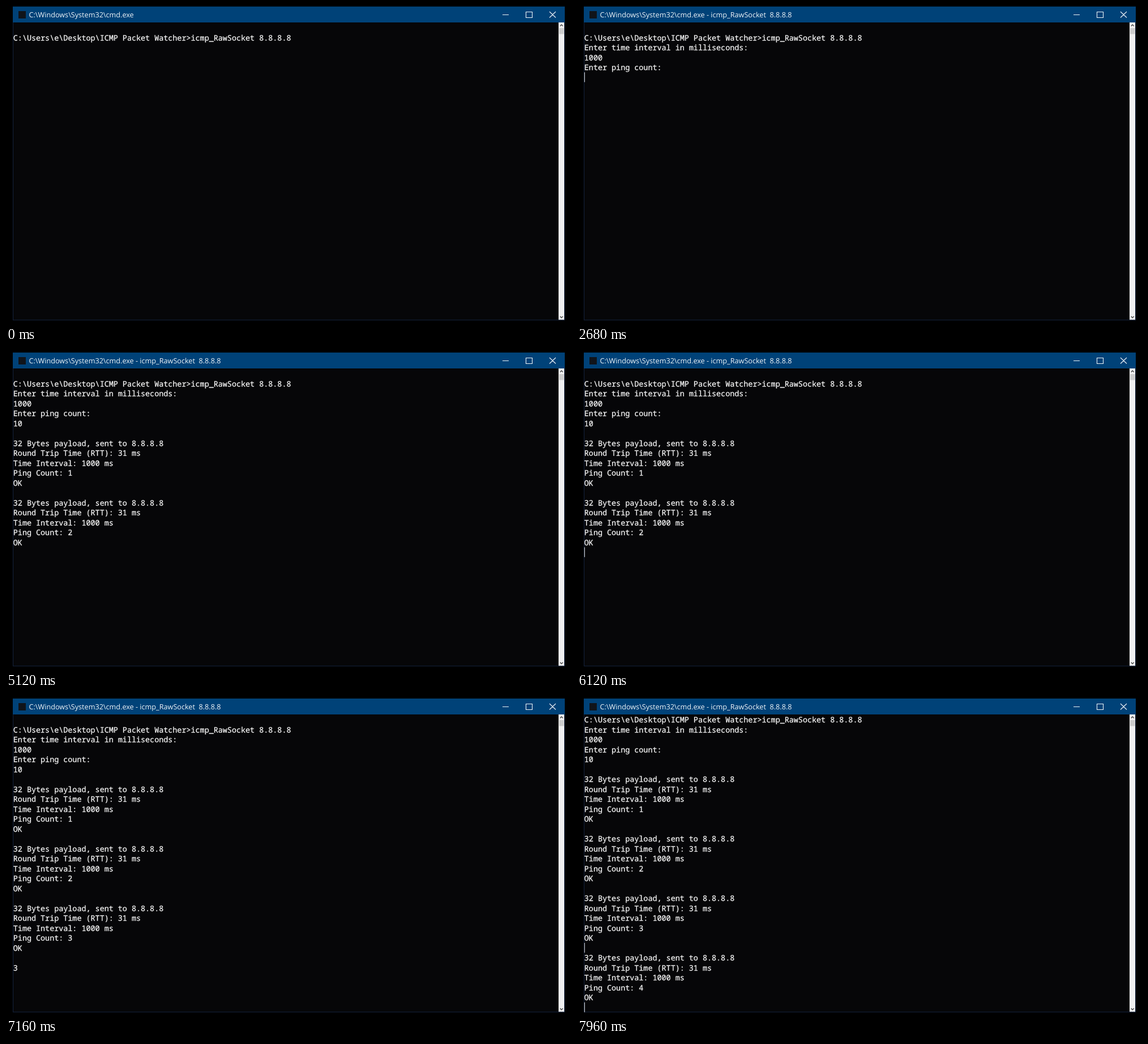
These frames come from a looping animation (998 by 561 pixels, 8 s). An HTML page:

```html
<!DOCTYPE html>
<html lang="en">
<head>
<meta charset="utf-8">
<title>Console</title>
<style>
  html, body { margin: 0; width: 100%; height: 100%; overflow: hidden; background: #000; }
  svg { display: block; width: 100vw; height: 100vh; }
  text { white-space: pre; text-rendering: geometricPrecision; }
  #title { font: 12.65px "Open Sans", "Noto Sans", sans-serif; fill: #f0f4f8; }
  #rows text {
    font: 13.42px "Noto Sans Mono", "DejaVu Sans Mono", monospace;
    fill: #f4f4f4; stroke: #f4f4f4; stroke-width: .3;
  }
  .buttons { fill: none; stroke: #f0f4f8; stroke-width: 1.1; }
  .arrows { fill: none; stroke: #444; stroke-width: 1.3; }
</style>
</head>
<body>
<svg viewBox="0 0 998 561" xmlns="http://www.w3.org/2000/svg">
  <rect width="998" height="561" fill="#000"/>
  <rect x="12" y="1" width="975" height="553.5" fill="#14223e"/>
  <rect x="13" y="29" width="963" height="524.5" fill="#060608"/>
  <rect x="12" y="1" width="975" height="28" fill="#004278"/>
  <rect x="22" y="9" width="13" height="13" fill="#10141a"/>
  <text id="title" x="40.5" y="20.3"></text>
  <path class="buttons" d="M877 15.5H888M918.5 10.5H929.5V20.5H918.5ZM960 10L971 20.5M971 10L960 20.5"/>
  <rect x="976" y="29" width="10" height="524.5" fill="#f0f0f0"/>
  <rect x="977" y="39" width="8.5" height="10.5" fill="#cdcdcd"/>
  <path class="arrows" d="M978.7 35.5L981.2 33L983.7 35.5M978.7 547.5L981.2 550L983.7 547.5"/>
  <g id="screen">
    <g id="rows"></g>
    <rect id="ghost" width="1.1" height="17.3" fill="#c8c8c8"/>
    <rect id="caret" width="1.1" height="17.3" fill="#d8d8d8"/>
  </g>
</svg>
<script>
const LOOP = 8000, PITCH = 17.5, TOP = 47, LEFT = 12.8, CHAR = 8.05;
const BLINK = 1060, BLINK_START = 420;
const ENTER = 640, ASK_COUNT = 2560, SUBMIT = 3560, PARTIAL = 7160, SCROLL = 7200;
const PINGS = [4080, 5120, 6160, SCROLL];
const COMMAND = 'icmp_RawSocket 8.8.8.8';
const PROMPT = 'C:\\Users\\e\\Desktop\\ICMP Packet Watcher>' + COMMAND;

const el = id => document.getElementById(id);
const title = el('title'), caret = el('caret'), ghost = el('ghost'), screen = el('screen');

const rows = Array.from({ length: 31 }, (_, i) => {
  const row = document.createElementNS('http://www.w3.org/2000/svg', 'text');
  row.setAttribute('x', LEFT);
  row.setAttribute('y', TOP + i * PITCH + 13.5);
  return el('rows').appendChild(row);
});

const setText = (node, s) => { if (node.textContent !== s) node.textContent = s; };
const typed = (s, times, t) => s.slice(0, times.filter(at => t >= at).length);

function place(node, row, col, shown) {
  node.setAttribute('x', LEFT + col * CHAR);
  node.setAttribute('y', TOP + row * PITCH);
  node.setAttribute('visibility', shown ? 'visible' : 'hidden');
}

const pingLines = n => [
  '', '32 Bytes payload, sent to 8.8.8.8', 'Round Trip Time (RTT): 31 ms',
  'Time Interval: 1000 ms', 'Ping Count: ' + n, 'OK'
];

// Console content; the last line holds the caret.
function linesAt(t) {
  const lines = [PROMPT];
  if (t >= ENTER) lines.push('Enter time interval in milliseconds:', typed('1000', [1960, 2120, 2240, 2360], t));
  if (t >= ASK_COUNT) lines.push('Enter ping count:', typed('10', [3240, 3360], t));
  PINGS.forEach((at, i) => { if (t >= at) lines.push(...pingLines(i + 1)); });
  if (t >= SUBMIT) lines.push('');
  if (t >= PARTIAL && t < SCROLL) lines.push('3');
  return lines;
}

// The caret stays lit while typing and is hidden while output is printed.
function caretOn(t) {
  if (t >= 1480 && t < 3600) return true;
  if (t >= PARTIAL && t < SCROLL) return false;
  if (t >= PINGS[1] && t < 5700) return false;
  return (t - BLINK_START + BLINK) % BLINK < BLINK / 2;
}

function draw(t) {
  const lines = linesAt(t), last = lines.length - 1;
  rows.forEach((row, i) => setText(row, lines[i] || ''));
  setText(title, 'C:\\Windows\\System32\\cmd.exe' + (t >= ENTER ? ' - ' + COMMAND.replace(' ', '  ') : ''));
  place(caret, last, lines[last].length, caretOn(t));
  place(ghost, 23, 0, t >= SCROLL);
  screen.setAttribute('transform', `translate(0 ${t >= SCROLL ? -PITCH : 0})`);
}

const start = performance.now();
function tick(now) {
  draw(Math.max(0, now - start) % LOOP);
  requestAnimationFrame(tick);
}
draw(0);
requestAnimationFrame(tick);
</script>
</body>
</html>
```
